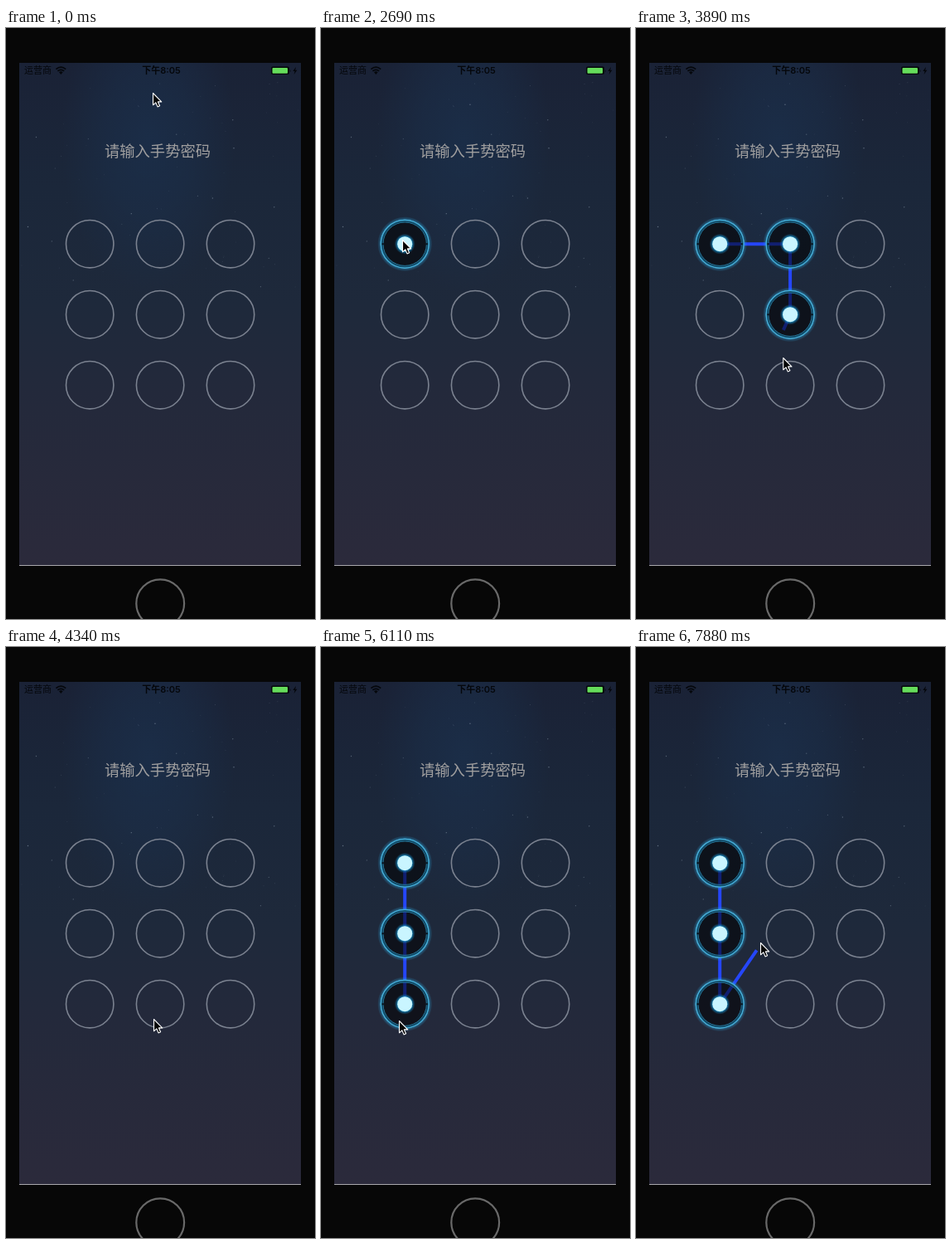
Animation of 373x712 px, one loop 8 s. Source, as an HTML page:

```html
<!DOCTYPE html>
<html lang="zh-CN">
<head>
<meta charset="utf-8">
<title>Gesture lock</title>
<style>
  html, body { margin: 0; width: 100%; height: 100%; overflow: hidden; background: #070707; }
  svg { display: block; }
  text { font-family: "Noto Sans CJK SC", "Noto Sans CJK", "Noto Sans", sans-serif; }
  .time { font-family: Inter, "Noto Sans CJK SC", "Noto Sans CJK", sans-serif; font-weight: 600; }
  .ring { fill: none; stroke: #7b8290; stroke-width: 1.6; }
  .lit { visibility: hidden; }
  .lit.on { visibility: visible; }
</style>
</head>
<body>
<svg width="373" height="712" viewBox="0 0 373 712">
  <defs>
    <linearGradient id="sky" x1="0" y1="0" x2="0" y2="1">
      <stop offset="0" stop-color="#1a2236"/>
      <stop offset=".25" stop-color="#1b273a"/>
      <stop offset=".48" stop-color="#1e293b"/>
      <stop offset=".65" stop-color="#23293b"/>
      <stop offset="1" stop-color="#2b2a3b"/>
    </linearGradient>
    <radialGradient id="haze">
      <stop offset="0" stop-color="#1b2f4b" stop-opacity=".8"/>
      <stop offset=".5" stop-color="#1b2f4b" stop-opacity=".5"/>
      <stop offset="1" stop-color="#1b2f4b" stop-opacity="0"/>
    </radialGradient>
    <radialGradient id="core">
      <stop offset=".68" stop-color="#1ba0dc" stop-opacity=".85"/>
      <stop offset="1" stop-color="#0f6ea8" stop-opacity="0"/>
    </radialGradient>
    <radialGradient id="halo">
      <stop offset=".8" stop-color="#2aa4dc" stop-opacity="0"/>
      <stop offset=".89" stop-color="#2aa4dc" stop-opacity=".45"/>
      <stop offset="1" stop-color="#2aa4dc" stop-opacity="0"/>
    </radialGradient>
    <clipPath id="screen"><rect x="16" y="42" width="340" height="605"/></clipPath>
    <g id="glow">
      <circle r="26" fill="#000" fill-opacity=".55"/>
      <circle r="27.6" fill="none" stroke="#0d3a52" stroke-width="2.6"/>
      <circle r="33" fill="url(#halo)"/>
      <circle r="28.9" fill="none" stroke="#45b0da" stroke-width="1.2"/>
      <circle r="26.2" fill="none" stroke="#267a9e" stroke-width=".9"/>
      <path d="M-26.5-1v2M26.5-1v2" stroke="#0a1620" stroke-width="2.4"/>
      <circle r="12.5" fill="url(#core)"/>
      <circle r="9" fill="#c9f5ff"/>
    </g>
  </defs>

  <rect width="373" height="712" fill="#070707"/>
  <g clip-path="url(#screen)">
    <rect x="16" y="42" width="340" height="605" fill="url(#sky)"/>
    <ellipse cx="172" cy="135" rx="105" ry="185" fill="url(#haze)"/>
    <g id="stars" fill="#a9bac8"></g>
  </g>
  <path d="M16 647.5H356" stroke="#a8a8ac"/>
  <circle cx="186.2" cy="693.2" r="28.9" fill="none" stroke="#696969" stroke-width="2.2"/>

  <g fill="#05070b">
    <text x="22" y="55.3" font-size="11">运营商</text>
    <text class="time" x="187.5" y="55.3" font-size="11" text-anchor="middle">下午8:05</text>
    <path d="M64 53.2L66.3 56L68.6 53.2Q66.3 51.4 64 53.2Z"/>
    <path d="M60.4 49.7Q66.3 44.7 72.2 49.7M62.4 51.9Q66.3 48.7 70.2 51.9" fill="none" stroke="#05070b" stroke-width="1.7"/>
    <rect x="320" y="46.5" width="22" height="9.5" rx="2"/>
    <path d="M342.8 49.5q1.4 2 0 4zM350 47l-3.7 5h2.3l-1 4 3.8-5.2h-2.3z"/>
  </g>
  <rect x="321.5" y="48" width="18.5" height="6.8" rx="1" fill="#65dc5b"/>
  <text x="183" y="155" font-size="18.3" font-weight="350" fill="#a09f9f" text-anchor="middle">请输入手势密码</text>

  <g id="rings"></g>
  <polyline id="line" fill="none" stroke="#2546fb" stroke-width="4" stroke-linejoin="round"/>
  <g id="lits"></g>
  <path id="cursor" d="M.5 .5V14.8L3.8 11.8L6 16.9L8.6 15.8L6.4 10.9H10.7Z" fill="#050505" stroke="#fff" stroke-width="1.1" stroke-linejoin="round"/>
</svg>
<script>
const LOOP = 8000, LAG = .6, REACH = 29;
const $ = id => document.getElementById(id);

function add(parent, tag, attrs) {
  const el = document.createElementNS("http://www.w3.org/2000/svg", tag);
  for (const k in attrs) el.setAttribute(k, attrs[k]);
  return $(parent).appendChild(el);
}

let seed = 7;
const random = () => (seed = seed * 16807 % 2147483647) / 2147483647;
for (let i = 0; i < 70; i++) {
  const bright = random() ** 5;
  add("stars", "circle", {
    cx: 18 + random() * 336, cy: 64 + random() ** 1.3 * 250,
    r: .5 + bright * .3, opacity: .12 + bright * .45
  });
}

const nodes = [], lits = [];
for (let i = 0; i < 9; i++) {
  const x = 101.2 + i % 3 * 84.9, y = 260.2 + Math.floor(i / 3) * 85;
  nodes.push([x, y]);
  add("rings", "circle", { class: "ring", cx: x, cy: y, r: 28.7 });
  lits.push(add("lits", "use", { class: "lit", href: "#glow", x, y }));
}

// Pointer glides, timed in ticks; bend shifts the middle of the curve.
const start = [177, 78];
const glides = [
  { from: -1, to: 4, end: [235, 166], bend: [82, -22] },
  { from: 5, to: 11, end: [98, 255], bend: [0, -23] },
  { from: 16, to: 19, end: [187, 265] },
  { from: 22, to: 26, end: [178, 448], bend: [-8, -14] },
  { from: 28, to: 29, end: [178, 453] },
  { from: 29, to: 36, end: [96, 250], bend: [68, 29] },
  { from: 37, to: 39, end: [94, 450] },
  { from: 39, to: 45, end: [135, 388] },
  { from: 45, to: 50, end: [138, 382] },
  { from: 50, to: 51, end: [150, 356] }
];
const presses = [{ down: 16, up: 27 }, { down: 37.6, up: Infinity }];

const easeOut = t => 1 - (1 - t) ** 2;

function pointer(n) {
  let pos = start;
  for (const { from, to, end, bend = [0, 0] } of glides) {
    if (n <= from) break;
    const k = easeOut(Math.min(1, (n - from) / (to - from)));
    pos = pos.map((p, i) => p + (end[i] - p) * k + 2 * k * (1 - k) * bend[i]);
  }
  return pos;
}

// Nodes touched, in order, by the lagging finger up to tick n.
function touched(down, n) {
  const hit = new Set();
  for (let s = down - LAG; s <= n - LAG + .01; s += .1) {
    const [x, y] = pointer(s);
    const i = nodes.findIndex(p => Math.hypot(p[0] - x, p[1] - y) < REACH);
    if (i >= 0) hit.add(i);
  }
  return [...hit];
}

// The screen refreshes in coarse ticks, slightly faster late in the loop.
function tickAt(t) {
  if (t < 290) return -1;
  return t < 5670 ? Math.min(35, Math.floor((t - 290) / 150))
                  : 36 + Math.floor((t - 5670) / 146.6);
}

function draw() {
  const n = tickAt(performance.now() % LOOP);
  const press = presses.find(p => n >= p.down && n < p.up);
  const hit = press ? touched(press.down, n) : [];
  lits.forEach((el, i) => el.classList.toggle("on", hit.includes(i)));
  const points = hit.map(i => nodes[i]);
  if (points.length) points.push(pointer(n - LAG));
  $("line").setAttribute("points", points.join(" "));
  $("cursor").setAttribute("transform", `translate(${pointer(n)})`);
  requestAnimationFrame(draw);
}
draw();
</script>
</body>
</html>
```
